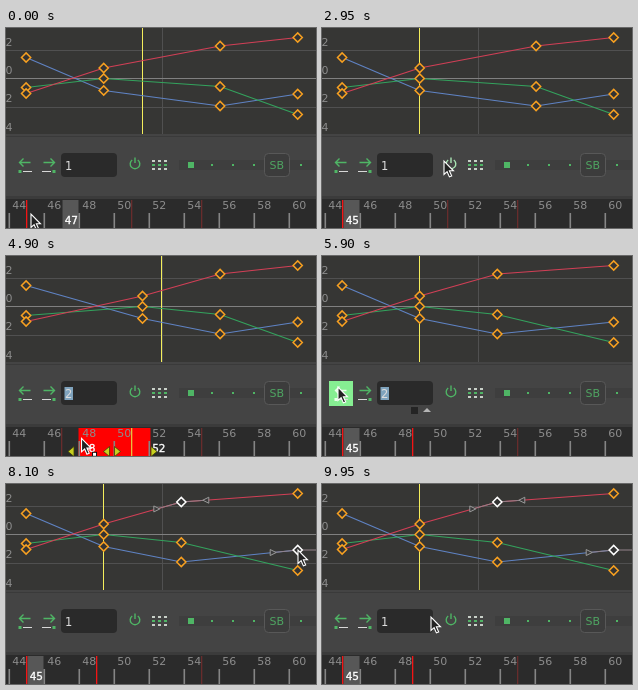
Write an HTML page that moves like this. It is 310 px wide and 200 px high and loops after 10 s.

```html
<!DOCTYPE html>
<html lang="en">
<head>
<meta charset="utf-8">
<title>Key nudge tool</title>
<style>
html, body { margin: 0; width: 100%; height: 100%; overflow: hidden; background: #444; }
svg { display: block; width: 310px; height: 200px; }
text { font: 11px "DejaVu Sans", sans-serif; fill: #8c8c8c; }
text.now { font-size: 10.5px; fill: #fff; stroke: #fff; stroke-width: .35; }
text.sb { fill: #4fa562; }
text.num { font-size: 11.5px; fill: #dcdcdc; }
</style>
</head>
<body>
<svg viewBox="0 0 310 200">
  <g id="graphBack"></g>
  <g id="graph"></g>
  <g id="panel"></g>
  <g id="tools"></g>
  <rect y="168" width="310" height="4" fill="#3b3b3b"/>
  <rect y="171" width="310" height="29" fill="#2b2b2b"/>
  <g id="range"></g>
  <g id="ruler"></g>
  <g id="marks"></g>
  <g id="pointer"></g>
</svg>
<script>
const LOOP = 10000, STEP = 50;
const GREEN = '#4fb565', ORANGE = '#f7a021';
const put = (id, html) => document.getElementById(id).innerHTML = html;
const graphX = f => 97.7 + 19.4 * (f - 45);
const timeX = f => 3 + 17.5 * (f - 44);
const rect = (x, y, w, h, fill, more = '') =>
  `<rect x="${x}" y="${y}" width="${w}" height="${h}" fill="${fill}" ${more}/>`;
const path = (d, stroke, w = 1, fill = 'none') =>
  `<path d="${d}" stroke="${stroke}" stroke-width="${w}" fill="${fill}"/>`;
const text = (x, y, s, cls = '') => `<text x="${x}" y="${y}" class="${cls}">${s}</text>`;
const between = (v, a, b) => v >= a && v < b;

// Story beats
const SCRUB = 250, DRAG = 4750, DRAG_END = 5000, APPLY = 5900, PICK_A = 7500, PICK_B = 8100;
const TYPED = { two: 3350, one: 6900 };
const nudges = [
  { at: 700, by: 1 }, { at: 1000, by: 1 }, { at: 1600, by: -1 }, { at: 1900, by: -1 },
  { at: 3950, by: 2 }, { at: APPLY, by: -2 }, { at: 9000, by: -1, hold: 300 }, { at: 9550, by: 1 }
];
const nudged = (from, to) => nudges.reduce((sum, n) => sum + (between(n.at, from, to + 1) ? n.by : 0), 0);
const pressed = (dir, t) =>
  nudges.some(n => n.by * dir > 0 && between(t, n.at - 100, n.at + (n.hold || 50)));
const busy = t => between(t, 9000, 9300);
const selecting = t => between(t, DRAG, APPLY);

// Pointer moves: leave, arrive, place
const LEFT = [16, 131], RIGHT = [44, 132], FIELD = [64, 137], POWER = [122, 133], START = [25, 186];
const moves = [
  [300, 550, RIGHT], [1250, 1450, LEFT], [2000, 2350, [140, 186]], [2700, 2950, POWER],
  [2950, 3150, FIELD], [3500, 3700, RIGHT], [4150, 4500, [127, 184]], [4600, DRAG_END, [66, 182]],
  [5450, 5750, LEFT], [6250, 6450, POWER], [6450, 6700, FIELD], [7100, 7450, [175, 18]],
  [7600, 8050, [292, 66]], [8200, 8550, [150, 178]], [8550, 8900, LEFT],
  [9300, 9450, RIGHT], [9650, 9950, [109, 133]]
];
function tip(t) {
  let [x, y] = START;
  for (const [leave, arrive, [px, py]] of moves) {
    const p = Math.min(1, Math.max(0, (t - leave) / (arrive - leave))), e = p * p * (3 - 2 * p);
    x += (px - x) * e;
    y += (py - y) * e;
  }
  return [x, y];
}

const second = t => 45 + nudged(0, Math.min(t, PICK_A));
function currentFrame(t) {
  if (t < SCRUB) return 47;
  if (!selecting(t)) return second(t);
  return 44 + Math.floor((tip(Math.min(t, DRAG_END))[0] - 3) / 17.5);
}

const curves = [
  { color: '#5f83c4', ys: [29.5, 62.5, 78, 66], picked: 3, since: PICK_B },
  { color: '#33a35d', ys: [59.5, 50.5, 58.5, 86.5] },
  { color: '#d23f56', ys: [65.5, 40, 18, 9.5], picked: 2, since: PICK_A }
];
function keyFrames(curve, t) {
  const base = [41, second(t), t < APPLY ? 51 : 49, 55];
  return base.map((f, i) => i === curve.picked ? f + nudged(PICK_A, t) : f);
}

const diamond = (x, y, color) =>
  path(`M${x - 4.6} ${y}l4.6 -4.6 4.6 4.6 -4.6 4.6z`, color, 1.5, '#333');

function handle(x, y, dir, slope) {
  const hx = x + 24.5 * dir, hy = y + 24.5 * dir * slope;
  return path(`M${x} ${y}L${hx} ${hy}`, '#93828a') +
    path(`M${hx + 3 * dir} ${hy - 3}v6l${-6 * dir} -3z`, '#9a9a9a', 1, '#3a3a3a');
}

function drawGraph(t) {
  const line = Math.floor(graphX(currentFrame(t))) + .5;
  let lines = path(`M${line} 0V106`, '#f4ee5c'), keys = '';
  for (const curve of curves) {
    const { color, ys, picked, since } = curve;
    const xs = keyFrames(curve, t).map(graphX);
    const slope = i => i < 3 ? (ys[i + 1] - ys[i]) / (xs[i + 1] - xs[i]) : 0;
    lines += path('M' + xs.map((x, i) => `${x} ${ys[i]}`).join('L'), color, 1.1);
    xs.forEach((x, i) => {
      const lit = i === picked && t >= since;
      if (lit) keys += handle(x, ys[i], -1, slope(i - 1)) + handle(x, ys[i], 1, slope(i));
      keys += diamond(x, ys[i], lit ? '#fff' : ORANGE);
    });
  }
  put('graph', lines + keys);
}

// dir -1 points left, 1 points right
function nudgeIcon(x, dir, down) {
  const c = down ? '#e9ffe9' : GREEN;
  return (down ? rect(x - 12, 125, 24, 25, '#86ee92') : '') +
    path(`M${x - 5.5 * dir} 134.5h${11 * dir}m${-4 * dir} -4l${4 * dir} 4l${-4 * dir} 4`, c, 1.4) +
    path(`M${x - 7 * dir} 143.5h${9 * dir}`, '#d8d8d8') +
    rect(x + 5 * dir - 1.5, 142, 3, 3, c);
}

function drawTools(t) {
  const [x, y] = tip(t);
  const overPower = between(x, 119, 138) && between(y, 124, 146);
  const overNudge = between(x, 7, 56) && between(y, 124, 150);
  // Dragged over, replaced by typing, then selected again on enter
  const { two, one } = TYPED;
  const lit = between(t, two - 200, two) || between(t, two + 100, one - 650) ||
    between(t, one - 200, one) || between(t, one + 50, PICK_A);
  put('tools', nudgeIcon(19, -1, pressed(-1, t)) + nudgeIcon(43, 1, pressed(1, t)) +
    (lit ? rect(58.5, 131, 8.5, 13, '#7fa3bd') : '') +
    text(59, 142, between(t, two, one) ? 2 : 1, 'num') +
    path('M126.2 132a4.8 4.8 0 1 0 5.6 0M129 129.5v5.5', overPower ? '#a9e6b4' : GREEN, 1.4) +
    (overNudge ? rect(89, 151, 7, 7, '#242424') + path('M101 156l4 -4 4 4z', 'none', 0, '#b5b5b5') : ''));
}

function drawTime(t) {
  const f = currentFrame(t), x = timeX(f), end = timeX(52), drag = selecting(t);
  put('range', drag ? rect(x - .5, 172, end - x + 2, 28, '#f00') : rect(x + 1, 172, 16, 28, '#575757'));

  let out = '';
  for (const k of new Set(curves.flatMap(c => keyFrames(c, t)))) {
    const inside = drag && between(k, f, 52);
    if (k >= 44) out += rect(timeX(k) - .5, 172, 1.3, 28, inside ? '#e8c040' : k % 4 === 3 ? '#682c2c' : '#f41414');
  }
  out += text(x + 3.2, 196, f, 'now');
  if (drag) {
    const mid = (x + end) / 2;
    const arrow = (ax, d) => path(`M${ax - 3 * d} 190.5v10l${6 * d} -5z`, '#40400a', .8, '#c8d020');
    out += text(end + 3.2, 196, 52, 'now') + arrow(x - 8, -1) + arrow(mid - 7.5, -1) +
      arrow(mid + 3.5, 1) + arrow(end + 5, 1);
  }
  put('marks', out);
}

function drawPointer(t) {
  const [x, y] = tip(t);
  const typing = between(t, TYPED.two - 50, TYPED.two + 150) || between(t, TYPED.one - 150, TYPED.one + 200);
  const inField = between(x, 57, 108) && between(y, 125, 149);
  let out = '';
  if (busy(t)) {
    out = '<circle cx="28" cy="143" r="4" fill="#fff" stroke="#111" stroke-width="1.5"/>' +
      path('M28 140.5v2.5h2', '#111');
  } else if (inField && !typing) {
    out = path(`M${x - 2} ${y - 6}h4m-2 0v12m-2 0h4`, '#ddd');
  } else if (!typing) {
    out = path(`M${x} ${y}v13.5l3.1 -2.8 2.3 5.2 2.3 -1 -2.3 -5.1h4.1z`, '#fff', 1.1, '#222');
    if (between(t, DRAG, DRAG_END + 100)) out += rect(x + 11, y + 14, 4, 4, '#fff', 'stroke="#111"');
  }
  put('pointer', out);
}

function drawFixed() {
  put('graphBack', rect(0, 0, 310, 106, '#363634') +
    path('M0 22.5H310M0 79.5H310M156.5 0V106', '#505050') + path('M0 50.5H310', '#808080') +
    [2, 0, 2, 4].map((n, i) => text(-.5, 18 + 28.2 * i, n)).join(''));

  let panel = rect(0, 106, 310, 62, '#444') + rect(0, 108, 310, 1, '#3a3a3a') +
    rect(55, 125, 56, 24, '#2a2a2a', 'rx="4"') + rect(173, 132, 137, 10, '#3e3e3e');
  for (let i = 0; i < 9; i++) {
    const row = Math.floor(i / 3);
    panel += rect(146 + 6 * (i % 3), 132 + 4 * row, 3, 2, row === 1 ? GREEN : '#c8d0c8');
  }
  panel += rect(182, 134, 6, 6, GREEN);
  for (let x = 205; x < 250; x += 21) panel += rect(x, 136, 2, 2, GREEN);
  panel += rect(258.5, 125.5, 25, 23, '#3c3c3c', 'rx="4" stroke="#585858"') +
    text(263.5, 141, 'SB', 'sb') + rect(294, 136, 2, 2, GREEN);
  put('panel', panel);

  let ruler = '';
  for (let f = 44; f <= 60; f += 2)
    ruler += rect(timeX(f) - .5, 185, 1.6, 15, '#858585') + text(timeX(f) + 3.2, 181, f);
  put('ruler', ruler);
}

let last = -1;
function tick(ms) {
  const t = Math.floor((ms % LOOP) / STEP) * STEP;
  if (t !== last) {
    last = t;
    [drawGraph, drawTools, drawTime, drawPointer].forEach(draw => draw(t));
  }
  requestAnimationFrame(tick);
}
drawFixed();
tick(performance.now());
</script>
</body>
</html>
```
